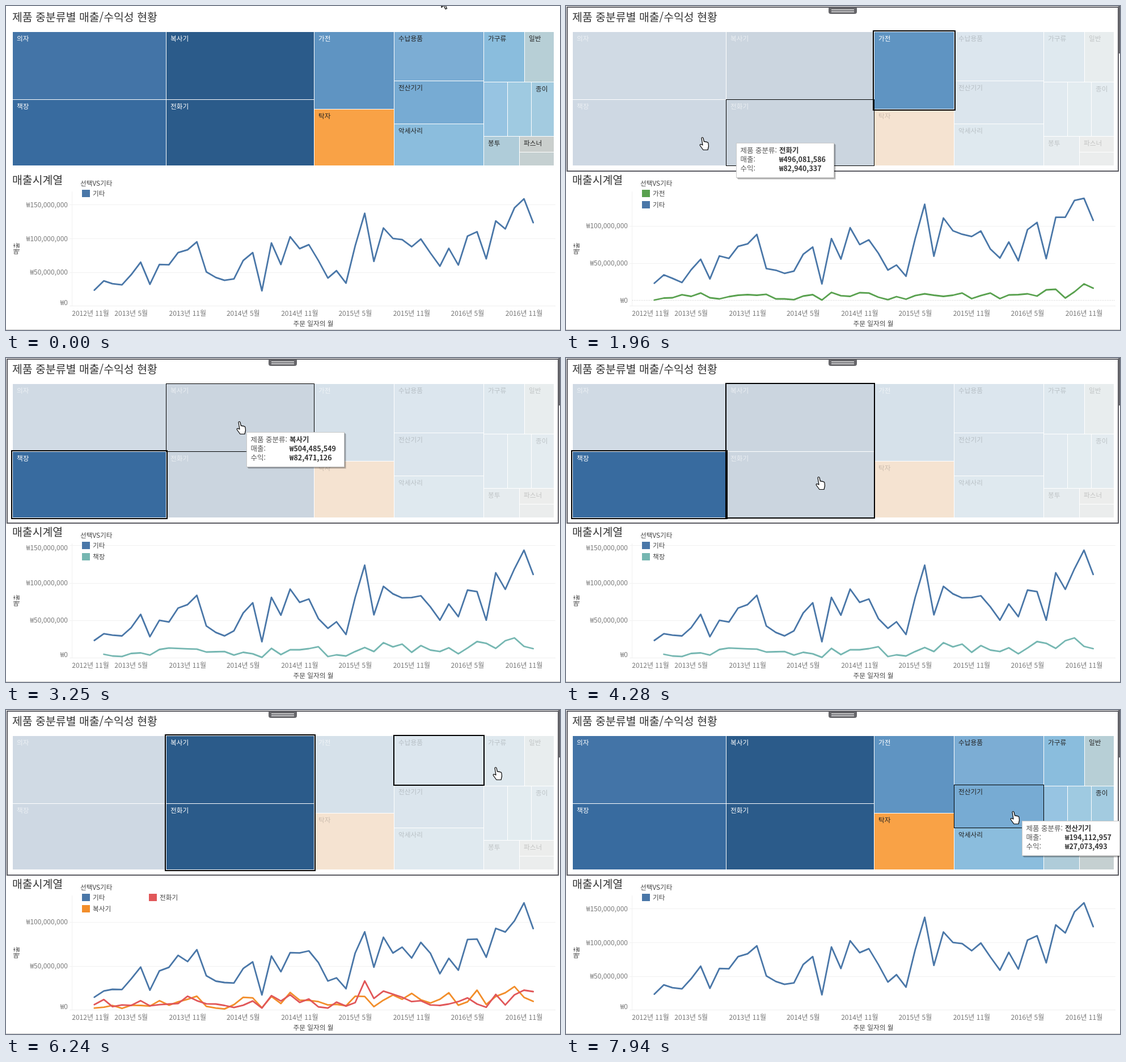
An HTML page that plays this animation: 977x573 px, repeating every 8000 ms.

```html
<!DOCTYPE html>
<html lang="ko">
<head>
<meta charset="utf-8">
<style>
html, body { margin: 0; width: 100%; height: 100%; overflow: hidden; background: #fff; }
svg { display: block; width: 977px; height: 573px; font: 12px "Noto Sans CJK KR", "Noto Sans CJK", sans-serif; }
.title { font-size: 19.4px; font-weight: 500; fill: #333; }
.axis { font-weight: 300; fill: #777; }
.key { font-size: 11.7px; font-weight: 300; fill: #444; }
.tile { font-size: 11.7px; font-weight: 300; }
.tip { font-size: 12.5px; font-weight: 300; fill: #555; }
.tip .val { font-weight: 700; fill: #333; }
.line { fill: none; stroke-width: 2.8; stroke-linejoin: round; stroke-linecap: round; }
.box { fill: none; }
</style>
</head>
<body>
<svg id="stage" viewBox="0 0 977 573"></svg>
<script>
const LOOP = 8000, STEP = 69, LAG = 67;
const stage = document.getElementById('stage');

function set(node, attrs) {
  for (const k in attrs) node.setAttribute(k, attrs[k]);
  return node;
}
function add(parent, tag, attrs, text) {
  const node = set(document.createElementNS('http://www.w3.org/2000/svg', tag), attrs);
  if (text) node.textContent = text;
  return parent.appendChild(node);
}
const group = (parent, attrs = {}) => add(parent, 'g', attrs);
const rect = (parent, x, y, width, height, attrs) => add(parent, 'rect', { x, y, width, height, ...attrs });
// y is the visual middle of the text
const label = (parent, x, y, text, cls, size = 12, attrs = {}) =>
  add(parent, 'text', { x, y: y + size * 0.37, class: cls, ...attrs }, text);
const show = (node, on) => { node.style.display = on ? '' : 'none'; };

// name, left, top, right, bottom, colour, sales, profit
const tiles = [
  ['의자', 12, 46, 282, 165, '#4374a7', '462,738,915', '55,284,610'],
  ['책장', 12, 166, 282, 282, '#386b9f', '454,129,362', '67,482,157'],
  ['복사기', 283, 46, 543, 165, '#2b5b8a', '504,485,549', '82,471,126'],
  ['전화기', 283, 166, 543, 282, '#2b5b8a', '496,081,586', '82,940,337'],
  ['가전', 544, 46, 684, 182, '#5f94c2', '313,773,144', '42,971,283'],
  ['탁자', 544, 183, 684, 282, '#f9a246', '229,416,503', '-31,527,840'],
  ['수납용품', 685, 46, 842, 132, '#7cadd4', '221,305,478', '25,916,204'],
  ['전산기기', 685, 133, 842, 208, '#77abd3', '194,112,957', '27,073,493'],
  ['악세사리', 685, 209, 842, 282, '#8bbddd', '188,640,271', '19,358,062'],
  ['가구류', 843, 46, 914, 134, '#8abddd', '102,847,316', '17,540,928'],
  ['일반', 915, 46, 966, 134, '#b7cfd6', '73,291,450', '4,827,139'],
  ['', 843, 135, 884, 230, '#97c4e2'],
  ['', 885, 135, 926, 230, '#9fcae1'],
  ['종이', 927, 135, 966, 230, '#a3cbe0'],
  ['봉투', 843, 231, 905, 282, '#afccd9'],
  ['파스너', 906, 231, 966, 258, '#cacfcd'],
  ['', 906, 259, 966, 282, '#c5d0d1']
].map(([name, x, y, x2, y2, color, sales, profit]) => ({ name, x, y, x2, y2, color, sales, profit }));

// Monthly sales in millions, January 2013 to December 2016
const total = [23.3, 37.1, 32.9, 31.3, 46.2, 64.8, 32.1, 61.4, 61, 79, 83.2, 95,
  50.5, 42.2, 38, 40, 67.3, 79, 22.4, 93.3, 61.4, 102.5, 84.9, 90.8,
  67.3, 41.3, 52.2, 33.8, 89.1, 137.3, 66, 115.5, 100, 98.3, 87.8, 99.2,
  78.5, 58.9, 85.3, 60.6, 103.4, 110, 69.8, 126, 114.2, 145.3, 158.7, 123.5];
const appliances = [0.4, 3, 3.4, 7.4, 5.3, 9.8, 3.4, 1.9, 4.9, 6.8, 7.6, 6.8,
  8, 1.9, 1.9, 0.8, 5.7, 7.6, 0.4, 10.6, 6.1, 5.3, 10.2, 9.8,
  4.2, 0.8, 4.9, 1.5, 6.4, 8.7, 6.8, 5.3, 6.8, 9.8, 2.3, 6.4,
  9.8, 2.3, 7.2, 7.6, 8.7, 5.7, 14, 14.8, 3, 11.4, 22, 16.3];
const bookcases = [null, 4.9, 2.6, 2, 6, 6.8, 3.8, 11.3, 13.2, 12.6, 12.2, 11.8,
  7.9, 8.3, 8.6, 3.8, 7.5, 5.6, 0.8, 12.8, 4.5, 10.9, 10.9, 12.4,
  15, 1.9, 4.1, 2.6, 8.6, 13.9, 8.6, 20.3, 14.7, 18.4, 7.5, 16.5,
  10.5, 8.6, 13.5, 5.6, 13.2, 21.8, 19.5, 12.8, 22.9, 26.7, 15.4, 12.4];
const copiers = [2.4, 3.3, 5.3, 2, 5.6, 5.3, 4.6, 10.7, 5.6, 9.4, 12.3, 15.8,
  4.3, 2.4, 1.4, 6.2, 14.5, 13.9, 2.7, 15.5, 7.5, 20, 11.3, 11,
  9.7, 5.9, 6.5, 4.9, 15.8, 15.5, 4, 11.3, 17.1, 12.3, 19, 11.7,
  8.1, 12.3, 19.7, 5.6, 9.4, 22.6, 6.5, 15.5, 19.7, 26.7, 14.5, 10];
const phones = [6.2, 12, 4, 5.9, 5.3, 10.7, 4.9, 6.2, 6.9, 7.5, 15.8, 10.7,
  7.2, 6.9, 5.3, 3, 5.6, 10.4, 2.4, 16.5, 10.4, 17.4, 8.8, 12.6,
  3.7, 2.4, 9.1, 4.6, 8.5, 33.1, 13.3, 21.6, 18.1, 14.6, 9.7, 10.7,
  5.9, 5.3, 6.9, 9.7, 13.9, 6.9, 3.3, 17.8, 5.9, 17.4, 22.6, 21];
const rest = (...parts) => total.map((v, i) => parts.reduce((left, p) => left - p[i], v));

// Time axis: month 0 is January 2013
const monthX = m => 155.8 + 0.5412 * (Date.UTC(2013, m, 1) - Date.UTC(2013, 0, 1)) / 864e5;

// Treemap
label(stage, 11, 20, '제품 중분류별 매출/수익성 현황', 'title', 19.4);
const map = group(stage);
for (const t of tiles) {
  const size = [t.x, t.y, t.x2 - t.x, t.y2 - t.y];
  rect(map, ...size, { fill: '#f4f4f4' });
  t.fill = rect(map, ...size, { fill: t.color });
  t.dark = t.x >= 685 || t.name === '탁자';
  t.text = label(map, t.x + 7, t.y + (t.y2 - t.y < 30 ? 11.5 : 12), t.name, 'tile', 11.7,
    { fill: t.dark ? '#222' : '#fff' });
}

// Line chart
label(stage, 11, 308, '매출시계열', 'title', 19.4);
label(stage, 131, 313.5, '선택VS기타', 'key', 11.7);
label(stage, 0, 0, '매출', 'key', 11.7, { transform: 'translate(19 429) rotate(-90)', 'text-anchor': 'middle' });
label(stage, 542, 562, '주문 일자의 월', 'key', 12, { 'text-anchor': 'middle' });
for (let m = -2; m <= 46; m += 6) {
  const d = new Date(Date.UTC(2013, m, 1));
  label(stage, Math.max(149, monthX(m)), 543.5, `${d.getUTCFullYear()}년 ${d.getUTCMonth() + 1}월`,
    'axis', 12, { 'text-anchor': 'middle' });
}
rect(stage, 116, 328, 1, 203, { fill: '#f0f0f0' });
rect(stage, 112, 530, 857, 1, { fill: '#eee' });
rect(stage, 0, 572, 977, 1, { fill: '#c8c8c8' });

function chart(zero, scale, top, series) {
  const g = group(stage);
  const yOf = v => zero - v * scale;
  for (let v = 0; v <= top; v += 50) {
    const y = yOf(v);
    if (v) rect(g, 112, Math.round(y), 857, 1, { fill: '#f1f1f1' });
    label(g, 109, Math.min(525, Math.max(336, y)), '₩' + (v ? v + ',000,000' : 0), 'axis', 12,
      { 'text-anchor': 'end' });
  }
  if (zero < 530) add(g, 'path', { d: `M117 ${zero}H968`, stroke: '#c4c4c4', 'stroke-dasharray': '1 2' });
  series.forEach(([name, color, data], i) => {
    const x = i > 1 ? 252 : 134, y = i === 1 ? 345 : 325;
    rect(g, x, y, 14, 13, { fill: color });
    label(g, x + 19, y + 6.5, name, 'key', 11.7);
    const points = data.map((v, m) => v === null ? '' : `${monthX(m).toFixed(1)},${yOf(v).toFixed(1)}`);
    add(g, 'polyline', { class: 'line', stroke: color, points: points.join(' ').trim() });
  });
  return g;
}
const blue = '#4a77a8';
const charts = [
  chart(530.4, 1.193, 150, [['기타', blue, total]]),
  chart(520.5, 1.32, 100, [['가전', '#59a14f', appliances], ['기타', blue, rest(appliances)]]),
  chart(530.5, 1.33, 150, [['기타', blue, rest(bookcases)], ['책장', '#76b7b2', bookcases]]),
  chart(530.8, 1.56, 100, [['기타', blue, rest(copiers, phones)], ['복사기', '#f28e2b', copiers],
    ['전화기', '#e15759', phones]])
];

// Active dashboard zone
const zone = group(stage);
rect(zone, 2, 2, 972, 290, { class: 'box', stroke: '#5b5b62', 'stroke-width': 2 });
rect(zone, 974, 0, 3, 84, { fill: '#66666b' });
add(zone, 'path', { d: 'M463 2H513V10Q513 14 509 14H467Q463 14 463 10Z', fill: '#66666a' });
rect(zone, 468, 6, 40, 1.4, { fill: '#eee' });
rect(zone, 468, 9.6, 40, 1.4, { fill: '#eee' });

// Outlines, tooltip, pointer
const outline = (color, width) => add(stage, 'rect', { class: 'box', stroke: color, 'stroke-width': width });
const gapBox = outline('#fff', 1);
const selBox = outline('#000', 2);
const pressBox = outline('#000', 2);
const hoverBox = outline('#000', 1);

const tip = group(stage, { class: 'tip' });
const shades = [3, 2, 1].map(d => rect(tip, d, d, 173, 62, { rx: 1, fill: '#000', opacity: 0.14 }));
const tipBox = rect(tip, 0.5, 0.5, 172, 61, { fill: '#fff', stroke: '#c9c9c9' });
const values = ['제품 중분류:', '매출:', '수익:'].map((name, i) => {
  label(tip, 7.5, 13.5 + 16 * i, name, '', 12.5);
  return label(tip, 76, 13.5 + 16 * i, '', 'val', 12.5);
});

const pen = { fill: '#fff', stroke: '#000', 'stroke-width': 1.2, 'stroke-linejoin': 'round' };
const hand = add(stage, 'path', { ...pen,
  d: 'M4 2.5Q5.5 0 7 2.5L8.5 9Q10 8 11 9.5Q12.5 8.5 13.5 10Q15.5 9.5 16 12L16.5 17L15 23.5H7L1.5 16Q.5 13.5 3 13.5L6 15Z' });
const arrow = add(stage, 'path', { ...pen, d: 'M0 0V16L4 12.5 7 19 9.5 18 6.5 11.5H11Z' });

// Pointer path: time, left, top
const path = [
  [0, 768, -13.5], [50, 768, -13.5], [120, 768, -17], [190, 775, -40], [390, 750, -20],
  [940, 632, 146], [1340, 632, 146], [1960, 235, 231], [2100, 150, 225], [2700, 150, 225],
  [3180, 403, 111], [3250, 406, 111], [3460, 416, 123], [3660, 425, 127], [3800, 425, 127],
  [4280, 440, 209], [4820, 440, 209], [5030, 722, 155], [5100, 740, 157], [5570, 792, 89],
  [5840, 858, 100], [7330, 858, 100], [7600, 790, 186], [7870, 783, 176], [7940, 783, 178],
  [LOOP, 783, 178]
];
const selections = [[0, 0, []], [1340, 1, ['가전']], [2700, 2, ['책장']],
  [4480, 3, ['복사기', '전화기']], [6320, 0, []]];
const presses = [[0, []], [2300, ['책장']], [2700, []], [3800, ['복사기']],
  [4070, ['복사기', '전화기']], [4480, []], [5500, ['수납용품']], [6320, []]];
const tips = [[0, false], [700, true], [2030, false], [2770, true], [3800, false],
  [4820, true], [5500, false], [7070, true]];
const at = (list, t) => list.filter(row => row[0] <= t).pop();

// The pointer moves in short even steps
function pose(t) {
  t = Math.max(0, t);
  const i = Math.max(1, path.findIndex(p => p[0] > t));
  const [t0, x0, y0] = path[i - 1], [t1, x1, y1] = path[i];
  const n = Math.max(1, Math.round((t1 - t0) / STEP));
  const k = Math.floor((t - t0) / (t1 - t0) * n + 1e-6) / n;
  return { x: Math.round(x0 + (x1 - x0) * k), y: y0 + (y1 - y0) * k };
}
const tileAt = p => tiles.find(t => p.x + 6 >= t.x - 1 && p.x + 6 < t.x2 && p.y + 2 >= t.y - 1 && p.y + 2 < t.y2);

function surround(box, names, pad) {
  const list = tiles.filter(t => t.name && names.includes(t.name));
  show(box, list.length);
  if (!list.length) return;
  const x = Math.min(...list.map(t => t.x)) - pad, y = Math.min(...list.map(t => t.y)) - pad;
  set(box, { x, y,
    width: Math.max(...list.map(t => t.x2)) + pad - x,
    height: Math.max(...list.map(t => t.y2)) + pad - y });
}

function draw(t) {
  const [, view, selected] = at(selections, t);
  const pressed = at(presses, t)[1];
  const now = pose(t), late = pose(t - LAG);
  const hover = pressed.length ? null : tileAt(late);

  charts.forEach((c, i) => show(c, i === view));
  show(zone, t >= 390);
  for (const tile of tiles) {
    const dim = selected.length && !selected.includes(tile.name);
    tile.fill.style.opacity = dim ? 0.2 : 1;
    tile.text.style.opacity = dim ? (tile.dark ? 0.2 : 0.6) : 1;
  }
  surround(gapBox, selected, 0.5);
  surround(selBox, selected, 2);
  surround(pressBox, pressed, 1);
  surround(hoverBox, hover ? [hover.name] : [], 0.5);

  const open = hover && hover.sales && at(tips, t)[1];
  show(tip, open);
  if (open) {
    const width = selected.includes(hover.name) ? 330 : 173;
    set(tip, { transform: `translate(${late.x + 21} ${Math.round(late.y) + 20})` });
    set(tipBox, { width: width - 1 });
    shades.forEach(s => set(s, { width }));
    [hover.name, '₩' + hover.sales, '₩' + hover.profit].forEach((v, i) => { values[i].textContent = v; });
  }

  const over = tileAt(now);
  show(hand, over);
  show(arrow, !over);
  set(over ? hand : arrow, { transform: `translate(${now.x} ${now.y})` });
}

function tick() {
  draw(performance.now() % LOOP);
  requestAnimationFrame(tick);
}
tick();
</script>
</body>
</html>
```
